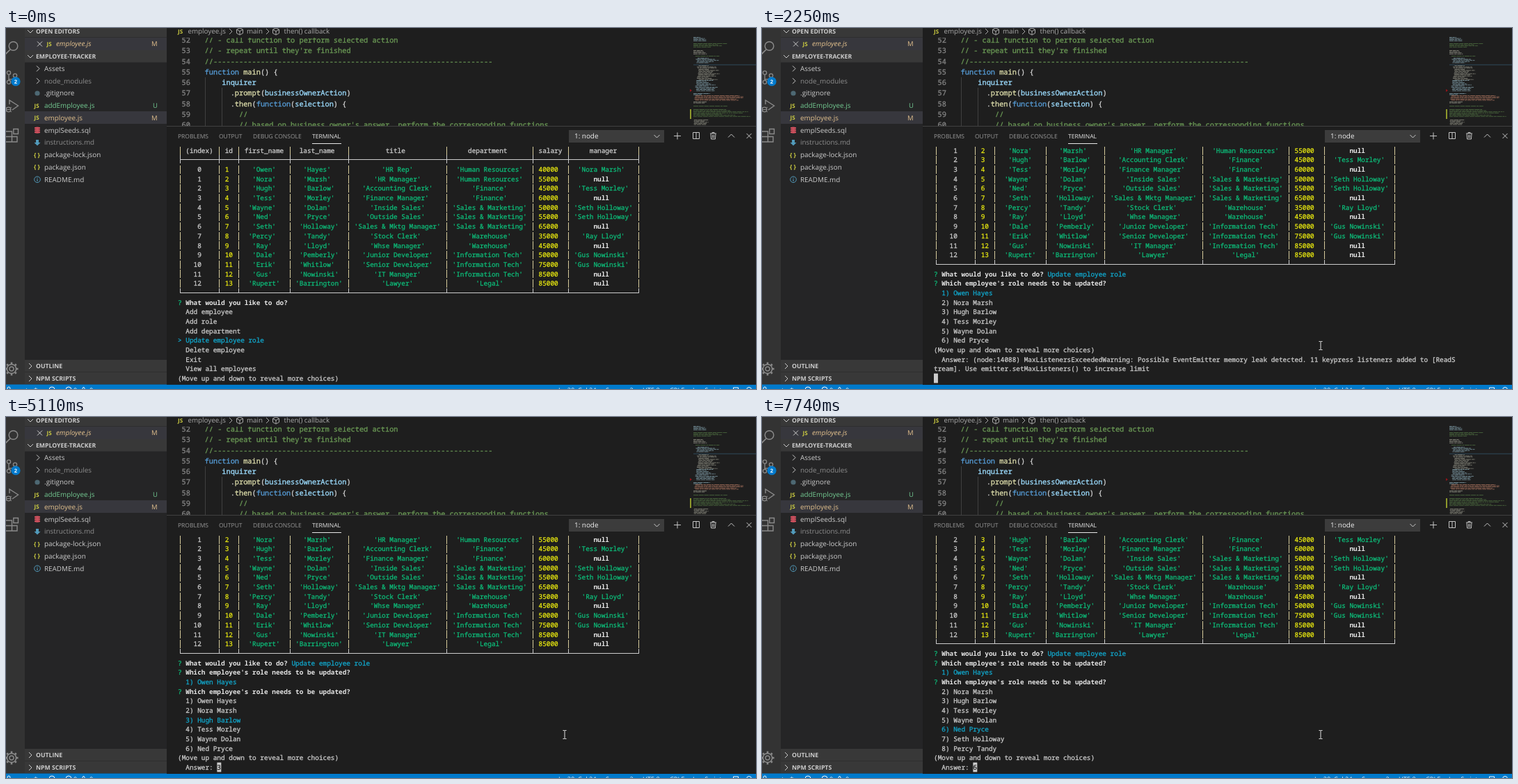
An HTML page with a canvas for the animation above (8000 ms loop, 1078 by 520 pixels).

```html
<!DOCTYPE html>
<html lang="en">
<head>
<meta charset="utf-8">
<title>Employee tracker</title>
<style>
html, body { margin: 0; width: 100%; height: 100%; overflow: hidden; background: #1e1e1e; }
canvas { display: block; }
</style>
</head>
<body>
<canvas id="stage" width="1078" height="520"></canvas>
<script>
const ctx = document.getElementById('stage').getContext('2d');
ctx.textRendering = 'geometricPrecision';

const LOOP = 8000;
const MONO = '"Noto Sans Mono", monospace';
const UI = '"Open Sans", sans-serif';
const GREEN = '#0dbc79', YELLOW = '#e5e510', CYAN = '#11a8cd', TEXT = '#cccccc', BRIGHT = '#e5e5e5';
const MODIFIED = '#e2c08d', DIM = '#8c8c8c';

// ---------- drawing helpers ----------
function rect(x, y, w, h, color) {
  ctx.fillStyle = color;
  ctx.fillRect(x, y, w, h);
}
function label(text, x, y, color = TEXT, size = 9.9, style = '', align = 'left') {
  ctx.font = `${style} ${size}px ${UI}`;
  ctx.fillStyle = color;
  ctx.textAlign = align;
  ctx.fillText(text, x, y + size * 0.35);
}
// Regular weight gets a hairline outline, so that small text keeps its brightness.
function grid(text, x, baseline, cell, color, bold) {
  ctx.font = `${bold ? 'bold ' : ''}${cell / 0.6}px ${MONO}`;
  ctx.fillStyle = ctx.strokeStyle = color;
  ctx.lineWidth = 0.3;
  ctx.textAlign = 'left';
  [...text].forEach((ch, i) => {
    if (ch === ' ') return;
    ctx.fillText(ch, x + i * cell, baseline);
    if (!bold) ctx.strokeText(ch, x + i * cell, baseline);
  });
}
function stroke(path, color = '#c5c5c5', width = 1) {
  ctx.strokeStyle = color;
  ctx.lineWidth = width;
  ctx.stroke(new Path2D(path));
}
function fill(path, color) {
  ctx.fillStyle = color;
  ctx.fill(new Path2D(path));
}
function disc(x, y, r, color) {
  ctx.fillStyle = color;
  ctx.beginPath();
  ctx.arc(x, y, r, 0, 7);
  ctx.fill();
}
function ring(x, y, r, color, width) {
  ctx.strokeStyle = color;
  ctx.lineWidth = width;
  ctx.beginPath();
  ctx.arc(x, y, r, 0, 7);
  ctx.stroke();
}
const chevronRight = (x, y, color) => stroke(`M${x - 2} ${y - 4}l4 4l-4 4`, color);
const chevronDown = (x, y, color) => stroke(`M${x - 4} ${y - 2}l4 4l4-4`, color);

// ---------- editor window ----------
function drawActivityBar() {
  const c = '#8a8a8a';
  rect(0, 0, 27, 520, '#333333');
  ring(10.5, 26, 6.3, c, 1.5);
  stroke('M6 31L-1 38', c, 1.7);
  ring(4, 64.5, 2.6, c, 1.3);
  ring(13, 68.5, 2.6, c, 1.3);
  ring(4, 78, 2.6, c, 1.3);
  stroke('M4 67V75.4M13 71Q12 74 4.5 74', c, 1.3);
  disc(14, 77, 6.6, '#007acc');
  label('2', 14, 77, '#fff', 7.5, 'bold', 'center');
  stroke('M5 110V104L17.5 112L9 118', c, 1.4);
  ring(3.5, 117.5, 3.3, c, 1.3);
  stroke('M-1 114l2 1.5M8 114l-2 1.5M-1 121l2-1.5M8 121l-2-1.5M0 117.5H7', c);
  stroke('M0 149H8.5V164H0M0 156.5H16V164H8.5M10.8 145.5H17.5V152.5H10.8Z', c, 1.4);
  ring(8, 491, 3, c, 1.4);
  ring(8, 491, 6.6, c, 1.5);
  for (let i = 0; i < 8; i++) {
    const a = i * Math.PI / 4, dx = Math.cos(a), dy = Math.sin(a);
    stroke(`M${8 + dx * 7} ${491 + dy * 7}L${8 + dx * 9.5} ${491 + dy * 9.5}`, c, 2.6);
  }
}

function sectionHeader(title, top, open) {
  rect(27, top, 204, 17.5, '#383838');
  (open ? chevronDown : chevronRight)(35, top + 9, TEXT);
  label(title, 43, top + 9, TEXT, 8.7, 'bold');
}
const scriptIcon = y => label('JS', 40.5, y, '#cbcb41', 8, 'bold');
const bracesIcon = y => label('{ }', 40, y, '#cbcb41', 8.5, 'bold');
const selectedRow = top => rect(27, top, 204, 18, '#37373d');

function drawSidebar() {
  rect(27, 0, 204, 520, '#252526');
  sectionHeader('OPEN EDITORS', -4, true);
  selectedRow(14);
  stroke('M45 19.5l7 7M52 19.5l-7 7', TEXT);
  label('JS', 58.5, 23, '#cbcb41', 8, 'bold');
  label('employee.js', 72, 23, MODIFIED, 9.9, 'italic');
  label('M', 209, 23, MODIFIED, 9.5);
  sectionHeader('EMPLOYEE-TRACKER', 32, true);
  selectedRow(120);
  const files = [
    ['Assets', TEXT, y => chevronRight(46, y, TEXT)],
    ['node_modules', DIM, y => chevronRight(46, y, TEXT)],
    ['.gitignore', TEXT, y => disc(45, y, 3.6, '#4d6873')],
    ['addEmployee.js', '#73c991', scriptIcon, 'U'],
    ['employee.js', MODIFIED, scriptIcon, 'M'],
    ['emplSeeds.sql', TEXT, y => {
      for (const d of [-3, 0, 3]) fill(`M41 ${y + d - 1}q4-1.6 8 0v1.8q-4 1.6-8 0z`, '#d2515f');
    }],
    ['instructions.md', DIM, y => fill(`M43 ${y - 4}h4v4h2.5l-4.5 4.5l-4.5-4.5h2.5z`, '#519aba')],
    ['package-lock.json', TEXT, bracesIcon],
    ['package.json', TEXT, bracesIcon],
    ['README.md', TEXT, y => {
      ring(45, y, 4.3, '#519aba', 1);
      stroke(`M45 ${y - 2.6}v1.2M45 ${y - 0.6}v3.2`, '#519aba', 1.2);
    }],
  ];
  files.forEach(([name, color, icon, status], i) => {
    const y = 58.5 + i * 17.75;
    icon(y);
    label(name, 55, y, color);
    if (status) label(status, status === 'U' ? 211 : 209, y, color, 9.5);
  });
  sectionHeader('OUTLINE', 478, false);
  sectionHeader('NPM SCRIPTS', 496, false);
}

function drawCode() {
  const cell = 6.175, comment = '#6a9955', fn = '#dcdcaa', name = '#9cdcfe', plain = '#d4d4d4', key = '#569cd6';
  const lines = [
    [['// - call function to perform selected action', comment]],
    [["// - repeat until they're finished", comment]],
    [['//' + '-'.repeat(65), comment]],
    [['function ', key], ['main', fn], ['() {', plain]],
    [['    inquirer', name]],
    [['      .', plain], ['prompt', fn], ['(', plain], ['businessOwnerAction', name], [')', plain]],
    [['      .', plain], ['then', fn], ['(', plain], ['function', key], ['(', plain], ['selection', name], [') {', plain]],
    [['        //', comment]],
    [["        // based on business owner's answer, perform the corresponding functions", comment]],
  ];
  rect(231, 0, 847, 520, '#1e1e1e');
  rect(286, 71, 1, 70, '#404040');
  rect(310, 86, 1, 55, '#404040');
  lines.forEach((runs, i) => {
    const baseline = 21 + i * 15.25;
    grid(String(52 + i), 252.5, baseline, cell, '#858585');
    let x = 285.6;
    for (const [text, color] of runs) {
      grid(text, x, baseline, cell, color);
      x += text.length * cell;
    }
  });
}

function cube(x, y) {
  stroke(`M${x} ${y - 5}l4.5 2.3v5.2l-4.5 2.5l-4.5-2.5v-5.2zM${x - 4.5} ${y - 2.7}l4.5 2.4l4.5-2.4M${x} ${y - 0.3}v5`, '#b8b8b8', 0.9);
}
function drawBreadcrumbs() {
  rect(231, 0, 750, 14, '#1e1e1e');
  label('JS', 247, 5, '#cbcb41', 8, 'bold');
  label('employee.js', 261.5, 5, '#a9a9a9', 9.8);
  chevronRight(323, 5, '#a9a9a9');
  cube(336, 5);
  label('main', 346, 5, '#a9a9a9', 9.8);
  chevronRight(376, 5, '#a9a9a9');
  cube(388, 5);
  label('then() callback', 399.5, 5, '#a9a9a9', 9.8);
}

// Each band: first y, last y, indent, longest line, colour.
function drawMinimap() {
  let seed = 7;
  const random = () => (seed = (seed * 16807) % 2147483647) / 2147483647;
  const bands = [
    [13, 19, 0, 22, '#7d9aa5'], [22, 28, 0, 54, '#4c6b3f'], [32, 38, 0, 20, '#8c8c80'],
    [40, 41, 4, 54, '#4c6b3f'], [43, 51, 6, 32, '#7d9aa5'], [54, 74, 8, 30, '#8c8c80'],
    [75, 90, 5, 30, '#7d9aa5'], [94, 96, 0, 24, '#7d9aa5'], [97, 104, 3, 74, '#a06d59'],
    [106, 109, 0, 20, '#8c8c80'], [112, 113, 0, 54, '#4c6b3f'], [117, 128, 0, 88, '#4c6b3f'],
    [132, 139, 1, 26, '#8c8c80'],
  ];
  for (const [from, to, indent, longest, color] of bands) {
    for (let y = from; y < to; y += 1.65) {
      const end = 988 + indent + longest * (0.45 + 0.55 * random());
      for (let x = 988 + indent * (0.5 + random() / 2); x < end;) {
        const w = 2 + random() * 6;
        rect(x, y, Math.min(w, end - x), 0.8, color);
        x += w + 0.8;
      }
    }
  }
  rect(988, 52.5, 90, 1, '#2f4a5c');
  rect(983, 117, 2, 14, '#8f9a2c');
  fill('M983 88l3 2l-3 2z', '#94151b');
}

function drawPanel() {
  rect(231, 141, 847, 379, '#1e1e1e');
  rect(231, 141, 847, 1, '#414141');
  const tabs = [['PROBLEMS', 247], ['OUTPUT', 306], ['DEBUG CONSOLE', 355], ['TERMINAL', 440]];
  for (const [name, x] of tabs) label(name, x, 156, name === 'TERMINAL' ? '#e7e7e7' : '#989898', 8.5);
  rect(440, 166, 42, 1, '#e7e7e7');
  rect(809, 147, 137, 18, '#3c3c3c');
  label('1: node', 817, 156, '#f0f0f0', 9.9);
  chevronDown(935.5, 156, TEXT);
  stroke('M960 155.5h10M965 150.5v10');
  stroke('M987.5 150.5h9v9h-9zM992 150.5v9');
  stroke('M1012 152h9M1015 152v-1.5h3v1.5M1013 152.5l.6 7.5h5.8l.6-7.5M1015.5 154v4.5M1017.5 154v4.5');
  stroke('M1038 157.5l4.5-4.5l4.5 4.5');
  stroke('M1064.5 152l7 7M1071.5 152l-7 7');
}

function drawStatusBar() {
  rect(0, 513.5, 1078, 6.5, '#007acc');
  const y = 521.5, c = '#ffffff';
  ring(4, 519, 2, c, 1);
  label('master*', 10, y, c, 9.2);
  ring(66, 521, 4, c, 1);
  ring(90, 521, 4, c, 1);
  label('0', 97, y, c, 9.2);
  stroke('M107 524l4.5-7l4.5 7', c);
  label('0', 120, y, c, 9.2);
  for (const [text, x] of [['Ln 38, Col 24', 794], ['Spaces: 2', 862], ['UTF-8', 915], ['CRLF', 954], ['JavaScript', 987]])
    label(text, x, y, c, 9.2);
  stroke('M1045.5 523v-5h7v5', c);
  ring(1068, 521, 3.5, c, 1);
}

// ---------- terminal ----------
const CELL = 5.636, ROW = 13.69, LEFT = 247, TOP = 169.5;
const BARS = [0, 10, 15, 28, 43, 68, 90, 99, 117];
const HEADER = ['(index)', 'id', 'first_name', 'last_name', 'title', 'department', 'salary', 'manager'];
// first name, last name, title, department, salary in thousands, index of manager
const staff = [
  ['Owen', 'Hayes', 'HR Rep', 'Human Resources', 40, 1],
  ['Nora', 'Marsh', 'HR Manager', 'Human Resources', 55],
  ['Hugh', 'Barlow', 'Accounting Clerk', 'Finance', 45, 3],
  ['Tess', 'Morley', 'Finance Manager', 'Finance', 60],
  ['Wayne', 'Dolan', 'Inside Sales', 'Sales & Marketing', 50, 6],
  ['Ned', 'Pryce', 'Outside Sales', 'Sales & Marketing', 55, 6],
  ['Seth', 'Holloway', 'Sales & Mktg Manager', 'Sales & Marketing', 65],
  ['Percy', 'Tandy', 'Stock Clerk', 'Warehouse', 35, 8],
  ['Ray', 'Lloyd', 'Whse Manager', 'Warehouse', 45],
  ['Dale', 'Pemberly', 'Junior Developer', 'Information Tech', 50, 11],
  ['Erik', 'Whitlow', 'Senior Developer', 'Information Tech', 75, 11],
  ['Gus', 'Nowinski', 'IT Manager', 'Information Tech', 85],
  ['Rupert', 'Barrington', 'Lawyer', 'Legal', 85],
];
const fullName = i => staff[i][0] + ' ' + staff[i][1];
const quoted = text => `'${text}'`;
const column = n => LEFT + n * CELL;
const rowTop = n => TOP + n * ROW;
const barX = n => Math.round(column(n + 0.5));

function put(row, col, text, color = TEXT, bold = false) {
  grid(text, column(col), rowTop(row) + 10.1, CELL, color, bold);
}
function block(row, col, digit = '') {
  rect(column(col), rowTop(row) - 0.4, CELL + 0.3, ROW, TEXT);
  put(row, col, digit, '#1e1e1e');
}
function tableRule(row, last) {
  const y = Math.round(rowTop(row) + 6);
  rect(250, y, 660, 1, TEXT);
  for (const bar of BARS) rect(barX(bar), y - 6, 1, last ? 6 : 12, TEXT);
}
function tableRow(row, cells, style) {
  for (const bar of BARS) rect(barX(bar), Math.round(rowTop(row)) + 1, 1, 12, '#d6cb9c');
  cells.forEach((text, i) => {
    const room = BARS[i + 1] - BARS[i] - 1;
    put(row, BARS[i] + 1 + Math.floor((room - text.length) / 2), text, ...style(i, text));
  });
}
const headerStyle = () => [TEXT];
const cellStyle = (i, text) =>
  text === 'null' ? [BRIGHT, true] : i === 0 ? [TEXT] : i === 1 || i === 6 ? [YELLOW] : [GREEN];

function drawTable(scroll) {
  for (let line = scroll; line < 16; line++) {
    const row = line - scroll, i = line - 2;
    if (line === 0) tableRow(row, HEADER, headerStyle);
    else if (line === 1 || line === 15) tableRule(row, line === 15);
    else {
      const [first, last, title, department, salary, boss] = staff[i];
      tableRow(row, [String(i), String(i + 1), quoted(first), quoted(last), quoted(title), quoted(department),
        salary + '000', boss === undefined ? 'null' : quoted(fullName(boss))], cellStyle);
    }
  }
}

const ACTIONS = ['Add employee', 'Add role', 'Add department', 'Update employee role', 'Delete employee', 'Exit', 'View all employees'];
const ASK_ACTION = 'What would you like to do?';
const ASK_PERSON = "Which employee's role needs to be updated?";
const HINT = '(Move up and down to reveal more choices)';
const PICK_TIMES = [5110, 5660, 6270, 7740];

function drawTerminal(t) {
  rect(231, 168, 847, 345.5, '#1e1e1e');
  const scroll = t < 2250 ? 0 : t < 6270 ? 3 : 4;
  drawTable(scroll);
  let row = 16 - scroll;
  const ask = (question, answer = '') => {
    put(row, 0, '?', GREEN);
    put(row, 2, question, BRIGHT, true);
    put(row++, 3 + question.length, answer, CYAN);
  };
  const people = (from, to, picked) => {
    for (let n = from; n <= to; n++) put(row++, 2, `${n}) ${fullName(n - 1)}`, n === picked ? CYAN : TEXT);
  };

  if (t < 2170) {
    ask(ASK_ACTION);
    ACTIONS.forEach((action, i) => {
      if (i === 3) put(row, 0, '>', CYAN);
      put(row++, 2, action, i === 3 ? CYAN : TEXT);
    });
    put(row, 0, HINT);
  } else if (t >= 2250) {
    ask(ASK_ACTION, ACTIONS[3]);
    ask(ASK_PERSON);
    if (t < 4190) {
      people(1, 6, 1);
      put(row++, 0, HINT);
      put(row++, 2, 'Answer: (node:14088) MaxListenersExceededWarning: Possible EventEmitter memory leak detected. 11 keypress listeners added to [ReadS');
      put(row++, 0, 'tream]. Use emitter.setMaxListeners() to increase limit');
      block(row, 0);
    } else {
      const picked = 2 + PICK_TIMES.filter(time => t >= time).length;
      const from = picked < 6 ? 1 : 2;
      people(1, 1, 1);
      ask(ASK_PERSON);
      people(from, picked < 5 ? 6 : from + 6, picked);
      put(row++, 0, HINT);
      put(row, 2, 'Answer:');
      block(row, 10, String(picked));
    }
  }
}

// The pointer enters from the lower right, overshoots and settles.
const POINTER = [[897, 501], [872, 488], [838, 469], [813, 457], [799, 453], [796, 454], [800, 456], [803, 457]];
function drawPointer(t) {
  if (t < 460) return;
  const [x, y] = POINTER[Math.min(7, Math.floor((t - 460) / 78.5))];
  stroke(`M${x - 2.5} ${y - 5.5}h2l.5.5l.5-.5h2M${x} ${y - 5}v11M${x - 2.5} ${y + 6.5}h2l.5-.5l.5.5h2`, '#e0e0e0');
}

function drawWindow() {
  drawCode();
  drawBreadcrumbs();
  drawMinimap();
  drawPanel();
  drawSidebar();
  drawActivityBar();
  drawStatusBar();
}

const start = performance.now();
function frame() {
  const t = (performance.now() - start) % LOOP;
  drawTerminal(t);
  drawPointer(t);
  requestAnimationFrame(frame);
}
drawWindow();
frame();
</script>
</body>
</html>
```
